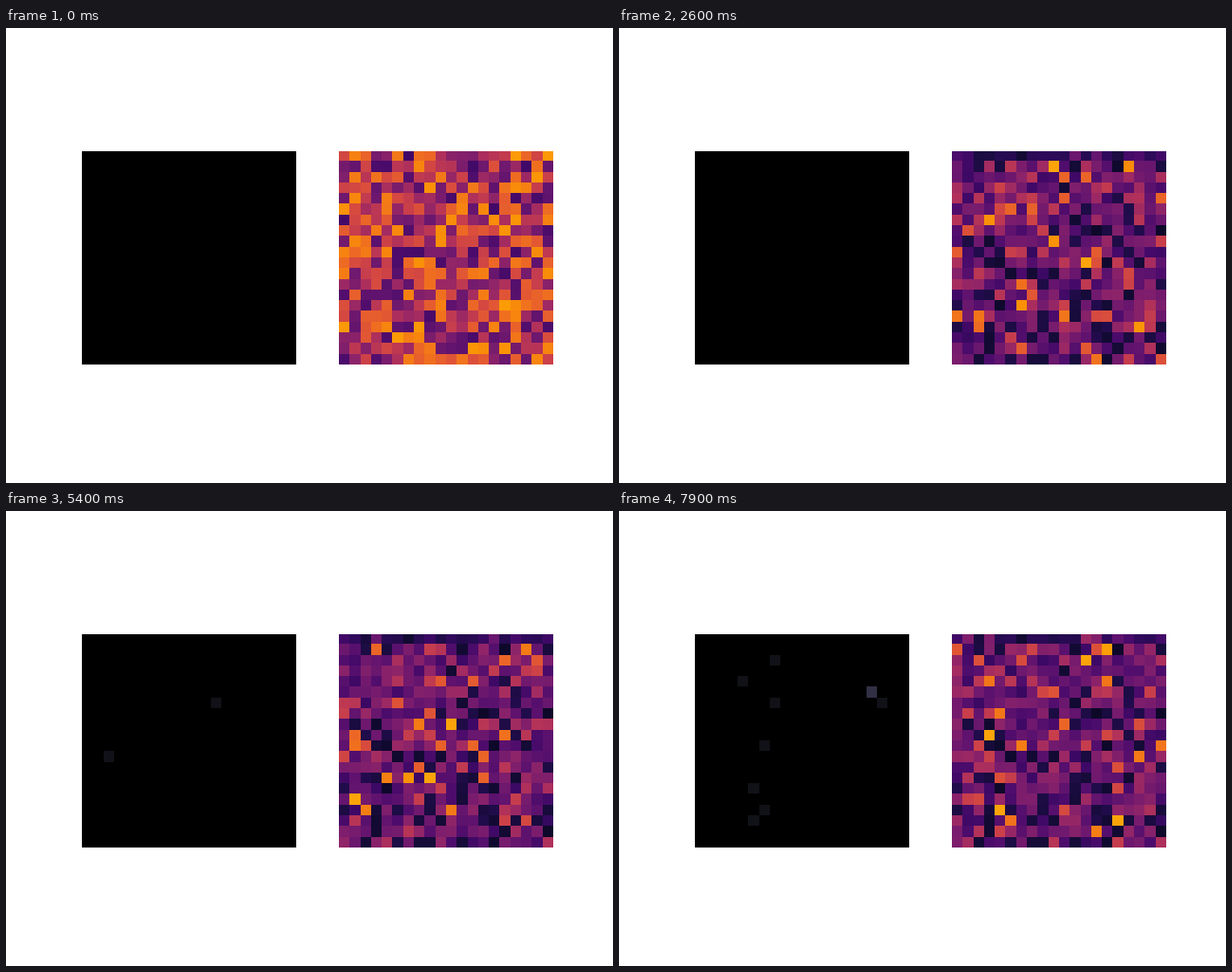
These frames come from a looping animation (640x480 px, 8000 ms). A matplotlib script:

```python
import numpy as np
import matplotlib.pyplot as plt
from matplotlib.animation import FuncAnimation

SIZE, FRAMES, STEP_MS = 20, 80, 100
DECAY, KICK_RATE, COLD_SHARE = 0.17, 0.055, 0.18
PULSE_LIFE, FAINT = 6, 0.08

# (column, row): steps at which the cell lights up
PULSES = {
    (7, 2): (14, 67, 75), (5, 14): (20, 34, 77), (2, 11): (52, 62),
    (12, 6): (53,), (16, 5): (67, 75), (14, 8): (68,), (11, 10): (67,),
    (5, 17): (69, 75), (4, 4): (78,), (17, 6): (76,), (7, 6): (79,),
    (6, 10): (78,), (6, 16): (79,),
}
STRONG = (16, 5)


def heat_steps():
    """Random cells cool to a resting level and flare up now and then."""
    rng = np.random.default_rng(7)
    shape = (SIZE, SIZE)
    heat = rng.uniform(0.2, 0.78, shape)
    cold = rng.random(shape) < COLD_SHARE
    rest = np.where(cold, rng.uniform(0.07, 0.13, shape),
                    rng.uniform(0.17, 0.35, shape))
    rest[0] = rng.uniform(0.08, 0.24, SIZE)
    rate = np.where(cold, 0, KICK_RATE)
    rate[0] /= 4

    steps = [heat, heat]
    while len(steps) < FRAMES:
        heat = heat + DECAY * (rest - heat)
        kick = (rng.random(shape) < rate) * rng.uniform(0.15, 0.5, shape)
        heat = np.minimum(heat + kick, 0.8)
        steps.append(heat)
    return steps


def spot_grid(n):
    grid = np.zeros((SIZE, SIZE))
    for (col, row), starts in PULSES.items():
        for count, start in enumerate(starts):
            if start <= n < start + PULSE_LIFE:
                strong = (col, row) == STRONG
                grid[row, col] = 0.13 + 0.09 * count if strong else FAINT
    return grid


heat = heat_steps()
fig, axes = plt.subplots(1, 2, figsize=(6.4, 4.8), dpi=100)
images = []
for ax, data, cmap in zip(axes, (spot_grid(0), heat[0]), ("bone", "inferno")):
    images.append(ax.imshow(data, cmap=cmap, vmin=0, vmax=1,
                            interpolation="nearest"))
    ax.axis("off")


def update(n):
    images[0].set_data(spot_grid(n))
    images[1].set_data(heat[n])
    return images


anim = FuncAnimation(fig, update, frames=FRAMES, interval=STEP_MS,
                     repeat=True, repeat_delay=0)
plt.show()
```
